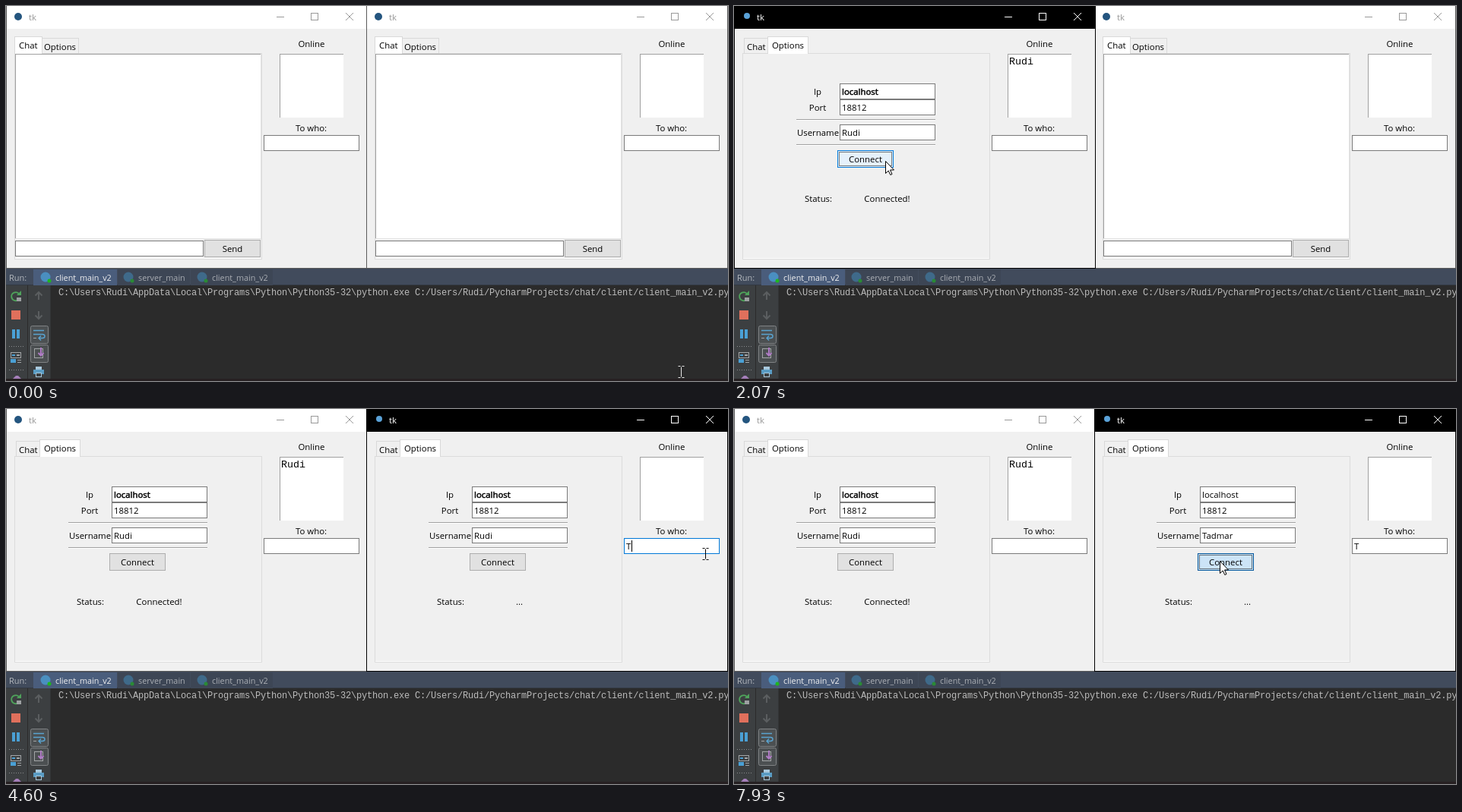
These frames come from a looping animation (950x494 px, 8 s). An HTML page:

```html
<!DOCTYPE html>
<html lang="en">
<head>
<meta charset="utf-8">
<title>Chat windows</title>
<style>
  html, body { margin: 0; width: 100%; height: 100%; overflow: hidden; background: #2b2b2b; }
  svg { display: block; width: 950px; height: 494px; }
  text { font-family: "Open Sans", "Noto Sans", sans-serif; white-space: pre; }
  .mono { font-family: "Liberation Mono", "DejaVu Sans Mono", monospace; }
</style>
</head>
<body>
<svg viewBox="0 0 950 494" xmlns="http://www.w3.org/2000/svg">
  <g id="ide"></g>
  <g id="windows"></g>
  <g id="pointer"></g>
</svg>
<script>
const LOOP = 8000, SIZE = 11.4;
const USER = "Rudi", TYPED = "Tadmar";
const $ = id => document.getElementById(id);
const pen = document.createElement("canvas").getContext("2d");

// ---- drawing helpers ----
const rect = (x, y, w, h, fill) =>
  `<rect x="${x}" y="${y}" width="${w}" height="${h}" fill="${fill}"/>`;
const box = (x, y, w, h, fill, line, extra = "") =>
  `<rect x="${x + .5}" y="${y + .5}" width="${w - 1}" height="${h - 1}" fill="${fill}" stroke="${line}" ${extra}/>`;
const text = (x, y, str, fill = "#000", size = SIZE, extra = "") =>
  `<text x="${x}" y="${y}" font-size="${size}" fill="${fill}" ${extra}>${str}</text>`;
const mid = (x, y, str) => text(x, y, str, "#000", SIZE, 'text-anchor="middle"');
const path = (d, line, extra = "") => `<path d="${d}" fill="none" stroke="${line}" ${extra}/>`;
const dot = (x, y, r, fill) => `<circle cx="${x}" cy="${y}" r="${r}" fill="${fill}"/>`;
const inside = (p, x, y, w, h) => p.x >= x && p.x < x + w && p.y >= y && p.y <= y + h;

function widthOf(str) {
  pen.font = `${SIZE}px "Open Sans", "Noto Sans", sans-serif`;
  return pen.measureText(str).width;
}

// ---- the run panel below the windows ----
function drawIde() {
  const tab = (x, w, tx, label, on) =>
    rect(x, 347, w, 21, on ? "#4a5d7c" : "#3d4655") +
    dot(tx - 13, 357, 6.5, on ? "#4a8fc0" : "#3f6a8a") +
    dot(tx - 8, 362, 2.5, on ? "#1fb71f" : "#2a8a35") +
    text(tx, 362, label, on ? "#f0f0f0" : "#a9adb3", 10.8);
  const arrow = (y, d) =>
    path(`M43 ${y - 5 * d}V${y + 5 * d}M38.5 ${y - .5 * d}L43 ${y - 5 * d}L47.5 ${y - .5 * d}`, "#5b5e60", 'stroke-width="2"');
  const dots = y => path(`M4 ${y}H25`, "#8a8c8e", 'stroke-dasharray="1 2"');
  const toggle = y => box(32, y, 24, 24, "#4c5052", "#808385", 'rx="2"');
  const prompt = `C:\\Users\\${USER}\\AppData\\Local\\Programs\\Python\\Python35-32\\python.exe ` +
    `C:/Users/${USER}/PycharmProjects/chat/client/client_main_v2.py`;

  $("ide").innerHTML =
    rect(0, 0, 950, 494, "#2b2b2b") +
    rect(0, 346, 950, 22, "#414b5c") + rect(0, 367, 950, 1, "#323842") +
    text(4, 362, "Run:", "#b4b8bd", 11) +
    tab(36, 110, 65, "client_main_v2", true) +
    tab(147, 95, 174, "server_main") +
    tab(243, 108, 271, "client_main_v2") +
    rect(0, 368, 59, 126, "#3c3f41") + rect(28, 368, 1, 126, "#2b2b2b") + rect(58, 368, 1, 126, "#323435") +
    text(69, 381, prompt, "#bbbbbb", 12, 'class="mono" letter-spacing="-.2"') +
    // left column
    path("M17.5 380A5.5 5.5 0 1 0 14 388", "#4fa35b", 'stroke-width="2"') +
    '<path d="M14 381H20V375Z" fill="#4fa35b"/>' + rect(14, 384, 6, 5, "#9da0a2") +
    rect(7, 401, 12, 12, "#e0705c") +
    rect(8, 426, 4, 12, "#4aa0d5") + rect(14, 426, 4, 12, "#4aa0d5") +
    dots(448.5) +
    box(6, 456, 14, 8, "none", "#a3a6a8") + rect(8, 459, 4, 2, "#4aa0d5") + rect(14, 459, 4, 2, "#a3a6a8") +
    rect(6, 465, 7, 5, "#4aa0d5") + rect(15, 466, 5, 1, "#a3a6a8") + rect(15, 469, 5, 1, "#a3a6a8") +
    dots(479.5) +
    '<path d="M8 492L13 487L16 487L20 491L17 494H9Z" fill="#a57fba"/>' +
    // right column
    arrow(382, 1) + arrow(407, -1) +
    toggle(421) + path("M36 427.5H50M36 432.5H48Q51 432.5 51 435Q51 437.5 48 437.5H43M46 434.5L43 437.5L46 440.5", "#59a3d0", 'stroke-width="1.4"') +
    path("M36 437.5H40", "#a3a6a8") +
    toggle(446) + box(37, 451, 12, 13, "none", "#a3a6a8") +
    path("M46 450V460M42.5 457L46 460.5L49.5 457", "#b07cc6", 'stroke-width="2"') +
    rect(39, 475, 8, 4, "#a9c9dd") + rect(36, 479, 14, 6, "#5a9cc4") + box(39, 483, 8, 6, "#3c3f41", "#a9c9dd") +
    rect(0, 491, 950, 3, "#262022");
}

// ---- widgets ----
function entry(p, x, y, w, value, o = {}) {
  const line = o.focus ? "#0078d7" : inside(p, x, y, w, 21) ? "#171717" : "#7a7a7a";
  const len = widthOf(value);
  const bold = o.heavy ? 'stroke="#000" stroke-width=".5"' : "";
  return box(x, y, w, 21, "#fff", line) +
    (o.sel ? rect(x + 3, y + 3, Math.round(len), 15, "#3399ff") : "") +
    text(x + 3, y + 15, value, o.sel ? "#fff" : "#000", SIZE, bold) +
    (o.caret ? rect(x + 3 + (o.home ? 0 : Math.round(len + .4)), y + 3, 1, 15, "#000") : "");
}

function button(p, x, y, label, o = {}) {
  const hover = inside(p, x, y, 74, 22);
  const [fill, line] = o.pressed ? ["#cce4f7", "#005499"]
    : hover ? ["#e5f1fb", "#0078d7"]
    : ["#e1e1e1", o.focus ? "#0078d7" : "#adadad"];
  return box(x, y, 74, 23, fill, line) +
    (o.focus ? box(x + 2, y + 2, 70, 19, "none", "#000", 'stroke-dasharray="1 1"') : "") +
    mid(x + 37, y + 16, label);
}

const sunken = (x, y, w, h) =>
  rect(x, y, w, h, "#fff") + rect(x, y, w, 1, "#a0a0a0") + rect(x, y, 1, h, "#a0a0a0");

function tabs(p, options) {
  const tab = (x, y, w, h, label, tx, on) => {
    const fill = on ? "#fff" : inside(p, x, y, w, h - 1) ? "#d8eaf9" : "#f0f0f0";
    return box(x, y, w, h, fill, "#d9d9d9") +
      (on ? rect(x + 1, y + h - 1, w - 2, 1, "#fff") : "") +
      text(tx, on ? 56 : 58, label);
  };
  const chat = options ? tab(13, 42, 33, 21, "Chat", 17) : tab(11, 40, 37, 23, "Chat", 17, true);
  const opts = options ? tab(44, 40, 54, 23, "Options", 50, true) : tab(47, 42, 49, 21, "Options", 50);
  return options ? chat + opts : opts + chat;
}

function chatPage(p) {
  return sunken(12, 63, 324, 244) + rect(335, 63, 1, 244, "#e3e3e3") + rect(12, 306, 324, 1, "#e3e3e3") +
    entry(p, 12, 309, 248, "") + button(p, 261, 308, "Send");
}

function optionsPage(p, o) {
  const rule = y => rect(82, y, 183, 1, "#a0a0a0") + rect(82, y + 1, 183, 1, "#fff");
  return mid(110, 117, "Ip") + entry(p, 139, 102, 126, "localhost", o.ip) +
    mid(110, 138, "Port") + entry(p, 139, 123, 126, "18812") +
    rule(149) +
    mid(110.5, 171, "Username") + entry(p, 139, 156, 126, o.name, o.user) +
    rule(182) +
    button(p, 136, 190, "Connect", o.button) +
    text(93, 258, "Status:") + mid(201.5, 258, o.status);
}

function appWindow(left, mouse, o) {
  const p = { x: mouse.x - left, y: mouse.y };
  const edge = o.active ? "#000" : "#5a5a5a", ink = o.active ? "#fff" : "#999";
  return `<g transform="translate(${left})">` +
    rect(0, 0, 476, 346, edge) + rect(1, 0, 474, 30, o.active ? "#000" : "#fff") +
    rect(1, 30, 474, 315, "#f0f0f0") +
    (o.active ? dot(17, 13, 4, "#5aa2d8") : dot(16, 14, 5, "#24557f")) +
    text(30, 19, "tk", ink) +
    rect(356, 14, 10, 1, ink) + box(401, 9, 10, 10, "none", ink) +
    path("M447 9L457 19M457 9L447 19", ink) +
    box(11, 62, 326, 272, "#f0f0f0", "#dcdcdc") + rect(12, 332, 324, 1, "#fff") +
    (o.options ? optionsPage(p, o) : chatPage(p)) + tabs(p, o.options) +
    mid(402, 54, "Online") + sunken(360, 63, 84, 84) +
    text(362, 77, o.online || "", "#000", 13.33, 'class="mono"') +
    mid(401.5, 165, "To who:") + entry(p, 339, 170, 126, o.to || "", o.toBox) +
    "</g>";
}

// ---- pointer: start, end, from, bend, to ----
const moves = [
  [70, 870, 888, 482, -43, 374, 78, 48],
  [1130, 1870, 78, 48, 365, 130, 199, 204],
  [2200, 2800, 199, 204, 400, 150, 537, 61],
  [3130, 3730, 537, 61, 760, 227, 920, 191],
  [5530, 5800, 920, 191, 790, 165, 660, 166],
  [5930, 6070, 660, 166, 480, 166, 310, 169],
  [7470, 7870, 310, 169, 500, 235, 639, 200]
];

function mouseAt(t) {
  const m = moves.filter(v => t >= v[0]).pop();
  if (!m) return { x: 888, y: 482 };
  const [t0, t1, x0, y0, cx, cy, x1, y1] = m;
  const u = Math.min(1, (t - t0 + 67) / (t1 - t0 + 67));
  const e = 1 - (1 - u) ** 1.35, f = 1 - e;
  const bend = (a, b, c) => Math.round(f * f * a + 2 * e * f * b + e * e * c);
  return { x: bend(x0, cx, x1), y: bend(y0, cy, y1) };
}

function drawPointer(m, t, leftOptions, rightOptions) {
  const over = (left, options) => {
    const areas = options ? [[139, 102, 126, 42], [139, 156, 126, 21]] : [[12, 63, 324, 244], [12, 309, 248, 21]];
    return [...areas, [339, 170, 126, 21]].some(([x, y, w, h]) => inside(m, left + x, y, w, h));
  };
  const dragging = t >= 5870 && t < 6070;
  const beam = dragging || (m.x > 58 && m.y > 368) || over(0, leftOptions) || over(474, rightOptions);
  const shape = beam
    ? path("M-3.5 -7.5H-.5M1.5 -7.5H4.5M.5 -6.5V6.5M-3.5 7.5H-.5M1.5 7.5H4.5", m.y > 346 ? "#e8e8e8" : "#000")
    : '<path d="M.5 .5V16.5L4.2 13L6.8 18.5L9 17.5L6.5 12H11.5Z" fill="#fff" stroke="#000"/>';
  $("pointer").innerHTML = `<g transform="translate(${m.x} ${m.y})">${shape}</g>`;
}

// ---- state by time ----
const keyTimes = [6530, 6670, 6870, 6930, 7070, 7130];

function draw(t) {
  const m = mouseAt(t);
  const within = (a, b) => t >= a && t < b;
  const blink = start => (t - start) % 900 < 600;
  const field = (a, b, start = a) => within(a, b) ? { focus: true, caret: blink(start) } : {};
  const keys = keyTimes.filter(k => t >= k).length;
  const plain = { active: false, online: "", to: "" };

  const left = appWindow(0, m, {
    ...plain, active: within(930, 2870), options: t >= 930,
    ip: { ...field(930, 1930), sel: t < 1930, heavy: t >= 1930 },
    name: USER,
    button: { focus: within(1930, 2870), pressed: within(1930, 2070) },
    status: t >= 2070 ? "Connected!" : "...",
    online: t >= 2070 ? USER : ""
  });
  const right = appWindow(474, m, {
    ...plain, active: t >= 2870, options: t >= 2930,
    ip: { ...field(2930, 3730), sel: t < 3730, heavy: within(3730, 5830) },
    name: keys ? TYPED.slice(0, keys) : USER,
    user: { ...field(5830, 7930), sel: within(5930, 6530), home: within(5930, 6530) },
    button: { focus: t >= 7930, pressed: t >= 7930 },
    status: "...",
    to: t >= 4600 ? "T" : "",
    toBox: field(3730, 5830, t < 4600 ? 3730 : 4600)
  });
  $("windows").innerHTML = within(930, 2870) ? right + left : left + right;
  drawPointer(m, t, t >= 930, t >= 2930);
}

// ---- clock: fifteen pictures a second ----
let last = -1;
function tick() {
  const step = Math.floor((performance.now() % LOOP + 3.4) * 3 / 200) % 120;
  if (step !== last) {
    last = step;
    draw(Math.round(step * 20 / 3) * 10);
  }
  requestAnimationFrame(tick);
}

drawIde();
draw(0);
tick();
</script>
</body>
</html>
```
